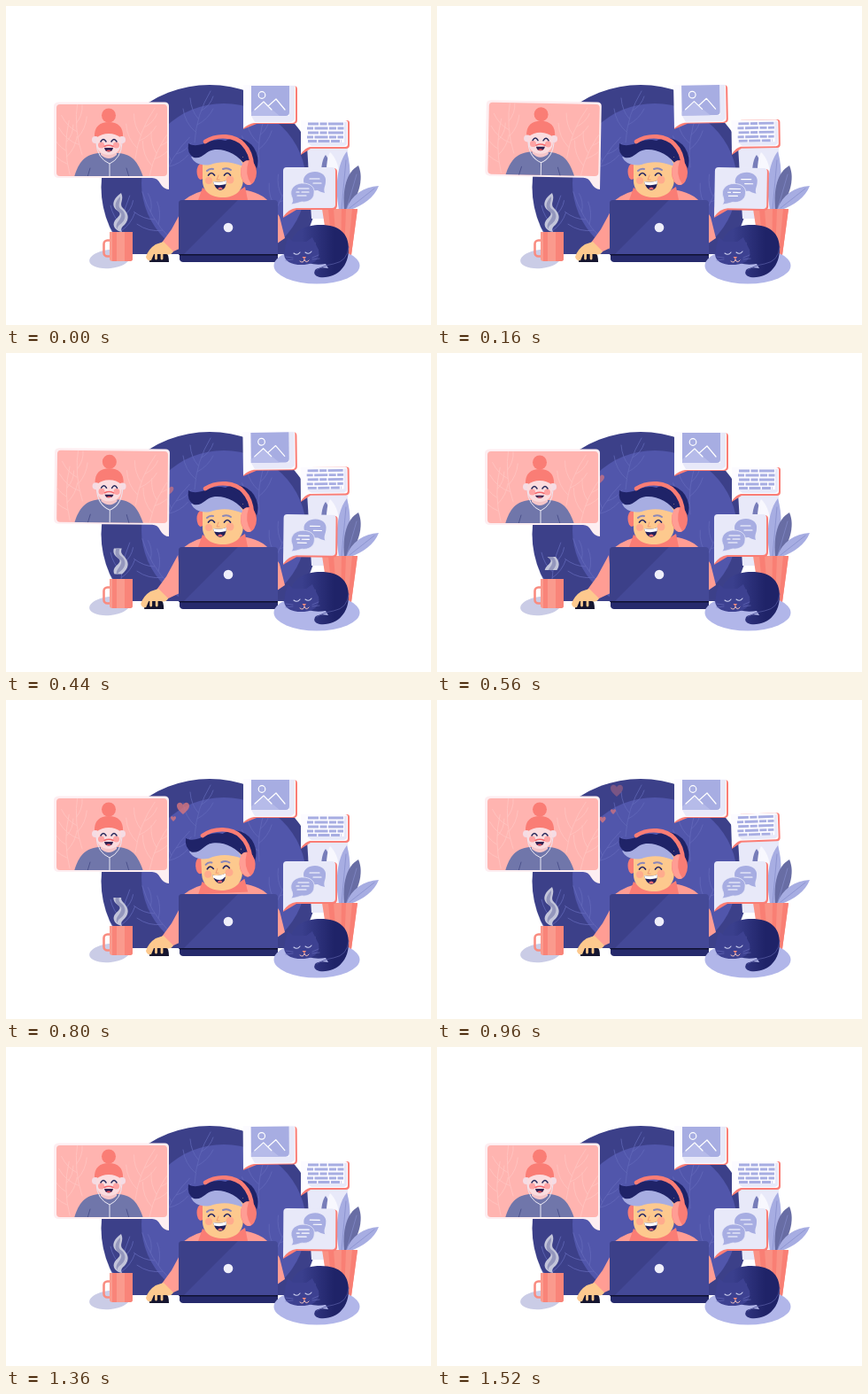
Write an HTML page that moves like this. It is 480x360 px and loops after 1560 ms.

```html
<!DOCTYPE html>
<html lang="en">
<head>
<meta charset="utf-8">
<title>Working from home</title>
<style>
html, body { margin: 0; width: 100%; height: 100%; overflow: hidden; background: #fff; }
svg { display: block; width: 480px; height: 360px; }
.line { fill: none; stroke-linecap: round; stroke-linejoin: round; }
.navy { fill: #1f2368; }
.coral { fill: #fa7d75; }
.lav { fill: #a7ade2; }
.pale { fill: #e8e9f9; }
.skin { fill: #fdc98e; }
</style>
</head>
<body>
<svg viewBox="0 0 480 360">
  <defs>
    <clipPath id="floor"><rect width="480" height="280"/></clipPath>
    <clipPath id="disc"><ellipse cx="230" cy="204.500" rx="122.500" ry="115.500"/></clipPath>
    <clipPath id="screen"><rect x="57" y="111" width="125" height="81" rx="4"/></clipPath>
    <clipPath id="steam"><rect id="steamSpan" x="110" width="40"/></clipPath>
    <linearGradient id="fur"><stop offset=".2" stop-color="#3a3f8d"/><stop offset=".75" stop-color="#1f2368"/></linearGradient>
    <path id="sprig" class="line" d="M0 0Q2-32 18-58M1-12Q-11-22-13-38M4-27Q-4-36-5-50M3-20Q15-26 21-38M8-36Q18-42 21-52"/>
    <path id="heart" d="M0 1C-.4.6-1 .2-1-.4C-1-1-.2-1.1 0-.5C.2-1.1 1-1 1-.4C1 .2.4.6 0 1Z"/>
  </defs>

  <g clip-path="url(#floor)">
    <g clip-path="url(#disc)">
      <rect x="100" y="80" width="270" height="210" fill="#3c4089"/>
      <ellipse cx="246" cy="200" rx="93" ry="90" fill="#5156ab"/>
      <g stroke="#646abb" stroke-width=".7">
        <use href="#sprig" transform="translate(213 154)"/>
        <use href="#sprig" transform="translate(286 182) rotate(-10)"/>
        <use href="#sprig" transform="translate(185 262) rotate(-48)"/>
        <use href="#sprig" transform="translate(130 274) rotate(-8)"/>
        <use href="#sprig" transform="translate(302 240) rotate(12)"/>
        <use href="#sprig" transform="translate(176 200) rotate(14)"/>
      </g>
    </g>
  </g>

  <g id="hearts" fill="#d8757d"></g>

  <!-- plant -->
  <path class="pale" d="M340 158H386V200L378 240H345Z"/>
  <path d="M362 229C354 204 354 176 361 168C371 182 372 208 369 229Z" fill="#777db9"/>
  <path d="M370 230C360 204 360 175 366 165C377 174 381 202 374 230Z" fill="#f8f8fe"/>
  <path class="lav" d="M376 229C371 205 374 178 385 164C391 185 389 209 382 229Z"/>
  <path d="M382 230C380 207 384 188 398 180C405 196 397 216 387 230Z" fill="#686da4"/>
  <path class="lav" d="M384 230C390 213 404 204 421 203C416 216 403 225 389 230Z"/>
  <path class="line" d="M379 229L384 174M385 228L396 190M388 228L416 206" stroke="#858bcb" stroke-width=".7"/>
  <path d="M357 229H397L390 281H365Z" fill="#fa9184"/>
  <path d="M364 229H370L374 281H369ZM379 229H384L382 281H378ZM391 229H397L390 281H386Z" fill="#f97f74"/>

  <!-- cards -->
  <g id="image">
    <path class="coral" d="M280 90H325Q329 90 329 94V129Q329 133 324 133H283L268 139V133Z"/>
    <path d="M268 89H324Q327 89 327 92V128Q327 132 323 132H280Q274 133 268 138Z" fill="#fcfbff"/>
    <path class="pale" d="M320 90H326V128L322 131H281L277 124H320Z"/>
    <path class="lav" d="M277 90H320V120Q320 124 316 124H277Z"/>
    <path d="M277 124V120L291 109L309 124Z" fill="#b6bbe9"/>
    <circle class="line" cx="289" cy="100.500" r="3.800" stroke="#fff" stroke-width="1.200"/>
    <path class="line" d="M281 117L291 108L300 117M296 113L305 105L315 117" stroke="#fff" stroke-width="1.200"/>
  </g>
  <g id="text">
    <path class="coral" d="M344 129H385Q388 129 388 132V157Q388 161 384 161H344L333 168V160Z"/>
    <path d="M333 129H383Q386 129 386 132V156Q386 159 383 159H343Q338 160 333 167Z" fill="#fcfbff"/>
    <path class="pale" d="M382 131H385V156L382 158H345L340 154H382Z"/>
    <g fill="none" stroke="#a7ade2" stroke-width="2.800">
      <path d="M341 133H382M341 143H382" stroke-dasharray="12 1.500 8 1.500 17 1"/>
      <path d="M340 138H382M340 148H381" stroke-dasharray="7 1.500 15 1.500 8 1.500"/>
      <path d="M341 152.500H379" stroke-dasharray="10 1.500 13 1.500"/>
    </g>
  </g>
  <g id="chat">
    <path class="coral" d="M325 183H370Q374 183 374 187V225Q374 230 369 230H328L313 239V229Z"/>
    <path class="pale" d="M313 186Q313 182 317 182H368Q372 182 372 186V224Q372 228 368 228H328Q319 229 313 238Z"/>
    <path class="lav" d="M349 187C357 187 362 192 361 198C361 203 358 206 360 211Q355 210 352 208C343 209 336 204 336 197C336 191 342 187 349 187Z"/>
    <path class="lav" d="M335 200C343 200 349 204 348 211C348 218 341 222 334 221Q328 223 322 224Q325 220 323 216C319 207 326 200 335 200Z" stroke="#e8e9f9" stroke-width=".8"/>
    <path class="line" d="M343 195H354M347 200H356M330 206H342M328 210H331M334 210H342M329 214H339" stroke="#fff" stroke-width="1.200"/>
  </g>

  <!-- video call -->
  <g id="call">
    <path d="M60 108.500H179Q184 108.500 184 113V207Q178 207 174 200Q171 194 165 194H60Q54 194 54 189V113Q54 108.500 60 108.500Z" fill="#fdeef1"/>
    <g clip-path="url(#screen)">
      <rect x="56" y="110" width="127" height="83" fill="#ffb4b0"/>
      <g stroke="#ffc4c0" stroke-width=".8">
        <use href="#sprig" transform="translate(72 190) rotate(-18)"/>
        <use href="#sprig" transform="translate(86 168) rotate(-22)"/>
        <use href="#sprig" transform="translate(146 172) rotate(4)"/>
        <use href="#sprig" transform="translate(162 192) rotate(8)"/>
      </g>
      <path d="M77 193C82 176 89 168 104 166H128C143 168 149 176 155 193Z" fill="#7076aa"/>
      <path class="line" d="M92 193L95 183M139 193L136 183" stroke="#4c528c" stroke-width="1"/>
      <path d="M107 158H125V168Q116 176 107 168Z" fill="#f5c5c8"/>
      <circle class="coral" cx="116" cy="123.500" r="8"/>
      <path class="coral" d="M100 149C99 136 106 131 116 131C126 131 133 136 132 149Z"/>
      <circle cx="101" cy="151" r="4" fill="#f5dce4"/>
      <circle cx="131" cy="151" r="4" fill="#f5dce4"/>
      <path d="M102 149Q108 144 116 144Q124 144 130 149V154C130 163 124 168 116 168C108 168 102 163 102 154Z" fill="#fbdcdf"/>
      <circle cx="107.500" cy="157" r="3.500" fill="#ffa3a3"/>
      <circle cx="124.500" cy="157" r="3.500" fill="#ffa3a3"/>
      <path class="line" d="M107 153Q110 148 113 153M119 153Q122 148 125 153" stroke="#282a5d" stroke-width="1.500"/>
      <path class="line" d="M111 158.500Q116 156 121 158.500" stroke="#f4686c" stroke-width="1.600"/>
      <g id="herMouth">
        <path d="M-5-2H5Q4 2.500 0 2.500Q-4 2.500-5-2Z" fill="#30204f"/>
        <path d="M-3 1.500Q0-.5 3 1.500Q0 3-3 1.500Z" fill="#f4565c"/>
      </g>
      <path class="line" d="M102 155Q103 172 117 178Q130 172 131 155M117 178V193" stroke="#e9e7f3" stroke-width="1"/>
    </g>
  </g>

  <!-- mug -->
  <ellipse cx="117" cy="285.500" rx="23" ry="10.500" fill="#cacce6" transform="rotate(-6 117 285)"/>
  <g clip-path="url(#steam)">
    <path d="M130 211C121 217 118 226 126 231C132 235 126 238 123 242C119 248 124 254 131 255C128 250 133 249 136 244C140 237 136 232 132 228C127 223 134 219 130 211Z" fill="#c3c5da"/>
    <path d="M129 215C130 221 124 226 131 230C138 237 133 244 128 247Q125 250 126 252C121 245 132 241 130 234C121 229 122 222 129 215Z" fill="#9497bd"/>
  </g>
  <rect class="line" x="110.500" y="264.500" width="13" height="18" rx="4" stroke="#f98c80" stroke-width="2.600"/>
  <path d="M117 255H143V285Q143 288 140 288H120Q117 288 117 285Z" fill="#fa9a8d"/>
  <path d="M120 255H125V288H120ZM134 255H143V285Q143 288 140 288H134Z" fill="#f98479"/>

  <!-- man -->
  <path d="M196 280V224Q206 213 224 208H272Q292 212 301 226L309 238L315 262L306 268V280Z" fill="#ff9d94"/>
  <g id="arm">
    <path d="M200 228L187 252L176 267L187 278L204 270Z" fill="#ff9d94"/>
    <path d="M162 289Q161 279 170 278H181Q184 281 184 289Z" fill="#15152f"/>
    <path class="skin" d="M178 266L189 277Q186 282 181 280H167L164 287Q159 288 158 283Q161 274 169 269Z"/>
    <path class="line" d="M169.500 279V285M176 279V285" stroke="#fdc98e" stroke-width="2.800"/>
  </g>
  <g id="head">
    <path class="coral" d="M222 205Q245 222 270 204L273 219H217Z"/>
    <ellipse class="navy" cx="259.500" cy="175" rx="25" ry="26"/>
    <ellipse class="coral" cx="220" cy="187" rx="4.500" ry="9"/>
    <path class="skin" d="M222 170H268V195C268 208 259 216 245 216C231 216 222 209 222 197Z"/>
    <path class="lav" d="M209 170C220 172 226 161 239 161C254 161 265 169 268 181C254 175 242 175 231 179C220 181 212 177 209 170Z"/>
    <path class="navy" d="M206 155C212 159 221 157 229 153C247 147 264 154 272 182C262 167 248 161 236 162C225 163 223 173 212 171Q204 166 206 155Z"/>
    <path class="line" d="M225 153C239 144 259 146 268 156Q277 165 278 181" stroke="#fa7d75" stroke-width="4.600"/>
    <ellipse class="coral" cx="274" cy="188" rx="9" ry="14"/>
    <path d="M267 178Q263 187 268 198Q273 204 277 201Q269 190 274 175Q270 173 267 178Z" fill="#ff9d94"/>
    <circle cx="229" cy="197" r="4" fill="#ffab8d"/>
    <circle cx="253" cy="196" r="4.500" fill="#ffab8d"/>
    <path class="line" d="M228.500 191Q232 186 235.500 191M246.500 191Q250 186 253.500 191" stroke="#242661" stroke-width="1.700"/>
    <path class="line" d="M227 186Q230 183 234 184M245 184Q250 182 254 185" stroke="#8a87b9" stroke-width="2"/>
    <path class="line" d="M240 191L238 196H241" stroke="#ef9b72" stroke-width="1"/>
    <path d="M234 198Q242 200 249 197Q249 207 242 208Q236 207 234 198Z" fill="#22205a"/>
    <path d="M239 206Q242 203 245 206Q242 208.500 239 206Z" fill="#f96b70"/>
    <path d="M234 198Q242 200 249 197L248.500 201Q242 203 235 201.500Z" fill="#fff"/>
    <path id="teeth" d="M234.500 198.500Q242 200 248.500 197.500Q248 204 242 204Q236 204 234.500 198.500Z" fill="#fff"/>
  </g>

  <!-- laptop -->
  <path d="M199 219H303Q307 219 307 223V281H195V223Q195 219 199 219Z" fill="#444997"/>
  <path d="M199 219H262L200 281H195V223Q195 219 199 219Z" fill="#3c4089"/>
  <path d="M196 280H307V286Q306 289 303 289H200Q197 289 196 286Z" fill="#262a6c"/>
  <path d="M196 280H307V281.500H196Z" fill="#101233"/>
  <circle cx="251" cy="250" r="5.300" fill="#eeeefa"/>

  <!-- cat -->
  <ellipse cx="351" cy="293" rx="48.500" ry="20.500" fill="#b1b6e9"/>
  <path d="M321 270C324 253 339 247 355 247C377 247 387 257 387 274C387 294 374 308 354 306Q346 304 349 298Q353 294 364 296L361 291C342 294 327 287 321 270Z" fill="url(#fur)"/>
  <path class="line" d="M387 272Q386 288 370 291Q358 293 351 298M349 267Q353 280 346 288" stroke="#4d5299" stroke-width=".9"/>
  <path d="M318 261L325 266H339L346 261Q349 268 353 275Q356 290 337 292Q315 293 314 280Q315 270 318 261Z" fill="#3d4191"/>
  <path class="line" d="M325 279Q329 282 332 278M338 278Q342 281 345 277" stroke="#d4d7f4" stroke-width="1.100"/>
  <path class="line" d="M332 288Q336 291 337 286Q339 291 342 287" stroke="#f4c2bd" stroke-width="1"/>
  <path d="M334.500 283H339L337 286Z" fill="#fa8b7e"/>
  <path class="line" d="M316 283L324 284M316 287L324 286M346 284L353 281M346 286L354 285" stroke="#686ebd" stroke-width=".6"/>
</svg>
<script>
const LOOP = 1560, STEP = 40;
const el = id => document.getElementById(id);
const set = (id, name, value) => el(id).setAttribute(name, value);
const ease = u => u * u * (3 - 2 * u);

// Value at time t from alternating time, value pairs
function key(t, ...k) {
  if (t <= k[0]) return k[1];
  for (let i = 2; i < k.length; i += 2)
    if (t < k[i]) return k[i - 1] + (k[i + 1] - k[i - 1]) * ease((t - k[i - 2]) / (k[i] - k[i - 2]));
  return k[k.length - 1];
}
const pulse = (t, from, peak, to) => key(t, from, 0, peak, 1, to, 0);
const turn = (id, angle, x, y) => set(id, "transform", `rotate(${angle} ${x} ${y})`);

// Each heart gives x, y, size and opacity
const hearts = [
  t => [key(t, 240, 186, 560, 184, 800, 200, 960, 203), key(t, 240, 182, 280, 175, 560, 142, 800, 122, 960, 102, 1040, 95),
        key(t, 240, 4, 560, 5, 800, 7), key(t, 220, 0, 280, .6, 560, .7, 800, .8, 960, .4, 1040, 0)],
  t => [key(t, 740, 184, 800, 189, 960, 199, 1160, 201), key(t, 740, 142, 800, 134, 960, 126, 1160, 111, 1280, 102),
        3, key(t, 720, 0, 800, .8, 1160, .65, 1280, 0)],
  t => [key(t, 860, 182, 960, 187, 1160, 199, 1360, 203), key(t, 860, 143, 960, 135, 1160, 124, 1360, 102),
        key(t, 860, 3, 1160, 5.5), key(t, 860, 0, 960, .8, 1160, .75, 1360, 0)]
];

function draw(t) {
  turn("call", 1.8 * pulse(t, 0, 280, 540), 183, 207);
  const sway = pulse(t, 40, 280, 540) + pulse(t, 960, 1160, 1440);
  turn("image", -2.2 * sway, 268, 138);
  turn("chat", 2 * sway, 313, 238);
  turn("text", -2 * (pulse(t, 40, 280, 540) + pulse(t, 820, 980, 1200)), 333, 166);

  const nod = pulse(t, 600, 780, 950);
  set("head", "transform", `translate(0 ${-nod}) rotate(${-3 * nod} 243 215)`);
  set("teeth", "opacity", nod);
  set("arm", "transform", `translate(${key(t, 80, 0, 280, -5.5, 560, -6, 740, 0)} 0)`);
  const open = key(t, 320, 1, 540, .65, 720, 1);
  set("herMouth", "transform", `translate(116 162) scale(1 ${open})`);

  const rising = t >= 620;
  const top = rising ? key(t, 620, 255, 800, 223, 920, 211) : key(t, 320, 211, 560, 230, 620, 238);
  const bottom = rising ? 255 : key(t, 300, 255, 560, 245, 620, 238);
  set("steamSpan", "y", top);
  set("steamSpan", "height", bottom - top);

  el("hearts").innerHTML = hearts.map(h => {
    const [x, y, size, alpha] = h(t);
    return `<use href="#heart" transform="translate(${x} ${y}) scale(${size})" opacity="${alpha}"/>`;
  }).join("");
}

const start = performance.now();
function tick() {
  const t = (performance.now() - start) % LOOP;
  draw(Math.floor(t / STEP) * STEP);
  requestAnimationFrame(tick);
}
tick();
</script>
</body>
</html>
```
